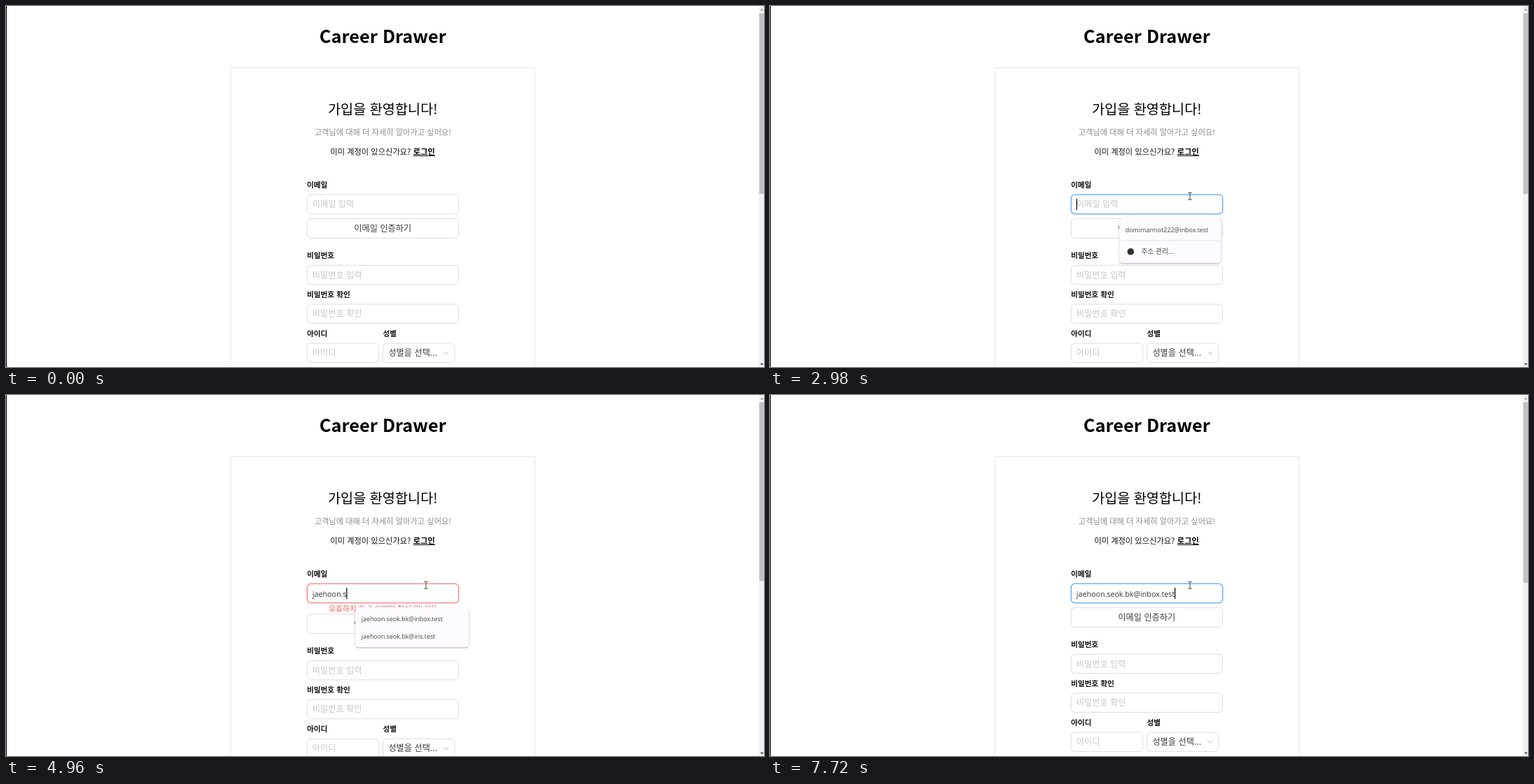
An HTML page for the animation above (8000 ms loop, 1083x517 px).

```html
<!DOCTYPE html>
<html lang="ko">
<head>
<meta charset="utf-8">
<title>Sign up</title>
<style>
  html, body { margin: 0; width: 100%; height: 100%; overflow: hidden; background: #fff; }
  svg { display: block; width: 1083px; height: 517px; }
  text { font-family: "Noto Sans CJK KR", "Noto Sans CJK", sans-serif; }
  .mid { text-anchor: middle; }
  .label { font-size: 10.65px; font-weight: 700; fill: #111; }
  .hint { font-size: 12.2px; fill: #c6c6c6; }
  .ctl { font-size: 12.2px; fill: #3c3c3c; }
  .typed { font: 10.7px "Open Sans", "Noto Sans", sans-serif; fill: #333; }
  .row { font: 8.83px "Open Sans", "Noto Sans", sans-serif; fill: #444; }
  .box { fill: #fff; stroke: #d9d9d9; stroke-width: .9; }
  .line { fill: none; stroke-width: 1.1; }
  .menu { fill: #fdfbff; filter: drop-shadow(0 1px 1.2px rgba(0, 0, 0, .32)); }
</style>
</head>
<body>
<svg viewBox="0 0 1083 517">
  <rect width="1083" height="517" fill="#fff"/>
  <rect width="1" height="517" fill="#000"/>
  <rect x="321" y="88.5" width="434.8" height="500" fill="none" stroke="#e6e6e6"/>
  <text class="mid" x="538.3" y="53.3" font-size="25.4" font-weight="700">Career Drawer</text>
  <text class="mid" x="538.3" y="154.9" font-size="19.7">가입을 환영합니다!</text>
  <text class="mid" x="538.3" y="185.1" font-size="11.25" fill="#8c8c8c">고객님에 대해 더 자세히 알아가고 싶어요!</text>
  <text x="463.3" y="212.6" font-size="11.25" fill="#111">이미 계정이 있으신가요?</text>
  <text x="581.8" y="212.6" font-size="11.25" font-weight="700">로그인</text>
  <path d="M582 214.5h31" stroke="#000"/>

  <text class="label" x="430" y="260.4">이메일</text>
  <rect class="box" x="430.3" y="270.2" width="216.4" height="27.6" rx="5.5"/>
  <rect id="ring" class="line" x="429.6" y="269.5" width="217.8" height="29" rx="6" stroke="#0591ff" style="stroke-width:1.6"/>
  <rect id="blue" class="line" x="430.3" y="270.2" width="216.4" height="27.6" rx="5.5" stroke="#5aa5ff"/>
  <rect id="red" class="line" x="430.3" y="270.2" width="216.4" height="27.6" rx="5.5" stroke="#ff6b6d"/>
  <text id="hint" class="hint" x="437.8" y="288.4">이메일 입력</text>
  <text id="typed" class="typed" x="437.8" y="288.5"></text>
  <rect id="caret" y="276" width="1.2" height="16" fill="#000"/>
  <text id="error" class="mid" x="538.3" y="309.6" font-size="10.78" fill="#fa5a5c">유효하지 않은 이메일 형식 입니다!</text>

  <g id="lower">
    <rect class="box" x="430.3" y="304.6" width="216.4" height="27.8" rx="5.5"/>
    <text class="ctl mid" x="538.3" y="323">이메일 인증하기</text>
    <text class="label" x="430" y="361.1">비밀번호</text>
    <rect class="box" x="430.3" y="371.4" width="216.4" height="27.2" rx="5.5"/>
    <text class="hint" x="437.8" y="389.5">비밀번호 입력</text>
    <text class="label" x="430" y="416.9">비밀번호 확인</text>
    <rect class="box" x="430.3" y="427" width="216.4" height="27.4" rx="5.5"/>
    <text class="hint" x="437.8" y="445.1">비밀번호 확인</text>
    <text class="label" x="430" y="472.9">아이디</text>
    <text class="label" x="538.5" y="472.9">성별</text>
    <rect class="box" x="430.3" y="483" width="102.4" height="27.6" rx="5.5"/>
    <text class="hint" x="437.8" y="501.1">아이디</text>
    <rect class="box" x="538.6" y="483" width="102.4" height="27.6" rx="5.5"/>
    <text class="ctl" x="546.4" y="501.1">성별을 선택...</text>
    <path d="M625.8 494.8l3.4 4 3.4-4" fill="none" stroke="#bcbcbc"/>
  </g>

  <g id="menu"></g>

  <rect x="1075.5" width="8" height="517" fill="#f1f1f1"/>
  <rect id="thumb" x="1076.3" y="10.5" width="6.7" fill="#c1c1c1"/>
  <path d="M1077.5 6.5l2.5-3 2.5 3z" fill="#a0a0a0"/>
  <path d="M1077.5 511.8l2.5 3 2.5-3z" fill="#505050"/>

  <path id="beam" d="M-2.8-5h2q.8 0 .8.8.0-.8.8-.8h2M0-4.3v8.6M-2.8 5h2q.8 0 .8-.8 0 .8.8.8h2" fill="none" stroke="#333" stroke-width=".9"/>
  <path id="arrow" d="M0 0v11.5l2.7-2.5 1.8 4 1.7-.8-1.8-3.8h3.7z" fill="#fff" stroke="#000" stroke-width=".8"/>
</svg>
<script>
const LOOP = 8000;
const email = 'jaehoon.seok.bk@inbox.test';
const keys = [3160, 3400, 3640, 3910, 4020, 4090, 4360, 4630, 4830, 5050, 5310, 5700, 5970,
  6180, 6310, 6580, 6720, 6790, 6860, 6930, 7050, 7250, 7320, 7390, 7460, 7580];
const saved = [email, 'jaehoon.seok.bk@iris.test', 'jaehoon77@inbox.test', 'jaehoonseok@inbox.test'];
const path = [[970, 705, 520], [1100, 648, 448], [1190, 591, 387], [1310, 596, 286], [1450, 600, 271], [1610, 600, 271], [1650, 600, 272.3]];

const $ = id => document.getElementById(id);
const within = (v, a, b) => v >= a && v < b;
const fade = (t, start, len) => {
  const p = Math.min(1, Math.max(0, (t - start) / len));
  return p * p * (3 - 2 * p);
};
const show = (id, v) => $(id).setAttribute('opacity', +v);

function pointer(t) {
  const i = path.findIndex(p => p[0] > t);
  if (i < 0) return path[path.length - 1].slice(1);
  if (!i) return null;
  const [t0, x0, y0] = path[i - 1], [t1, x1, y1] = path[i], p = (t - t0) / (t1 - t0);
  return [x0 + (x1 - x0) * p, y0 + (y1 - y0) * p];
}

const panel = (w, h) =>
  `<path class="menu" d="M505 304h5l5.5-5 5.5 5h${w - 28}q6 0 6 6v${h - 12}q0 6-6 6h-${w - 12}q-6 0-6-6v-${h - 12}q0-6 6-6z"/>`;
const row = (s, i) => `<text class="row" x="507.8" y="${323.7 + i * 25.2}">${s}</text>`;

function menu(t, text) {
  if (within(t, 2050, 4160))
    return panel(145.5, 64) + row('domimarmot222@inbox.test', 0) +
      '<path d="M499 335.8h145.5" stroke="#e5e1ea"/><circle cx="515.3" cy="351.8" r="4.8" fill="#333"/>' +
      '<text x="530.5" y="355.3" font-size="9.7" fill="#444">주소 관리...</text>';
  if (within(t, 4160, 5310) || within(t, 6050, 7320)) {
    const rows = saved.filter(s => s.startsWith(text));
    return panel(162.5, 6.8 + 25.2 * rows.length) + rows.map(row).join('');
  }
  return '';
}

let lastMenu;
function draw(t) {
  const text = email.slice(0, keys.filter(k => k <= t).length);
  const err = fade(t, 3200, 300) - fade(t, 7450, 250);
  const focus = fade(t, 1850, 200);

  show('blue', fade(t, 1310, 140) * (1 - err));
  show('ring', focus * .12 * (1 - err));
  show('red', err);
  show('error', err);
  show('hint', !text);
  $('lower').setAttribute('transform', `translate(0 ${9.3 * err})`);
  $('thumb').setAttribute('height', 258.5 - 2.7 * err);

  $('typed').textContent = text;
  $('caret').setAttribute('x', 437.6 + (text ? $('typed').getComputedTextLength() : 0));
  show('caret', t >= 1850 && !within(t, 2450, 2980));

  const html = menu(t, text);
  if (html !== lastMenu) $('menu').innerHTML = lastMenu = html;

  const pos = pointer(t);
  const overField = pos && pos[0] < 647 &&
    [[270, 298], [371, 399], [427, 455]].some(([a, b]) => within(pos[1], a, b));
  show('beam', !!overField);
  show('arrow', !!pos && !overField);
  for (const id of ['beam', 'arrow'])
    if (pos) $(id).setAttribute('transform', `translate(${pos})`);
}

function tick() {
  draw(performance.now() % LOOP);
  requestAnimationFrame(tick);
}
tick();
</script>
</body>
</html>
```
